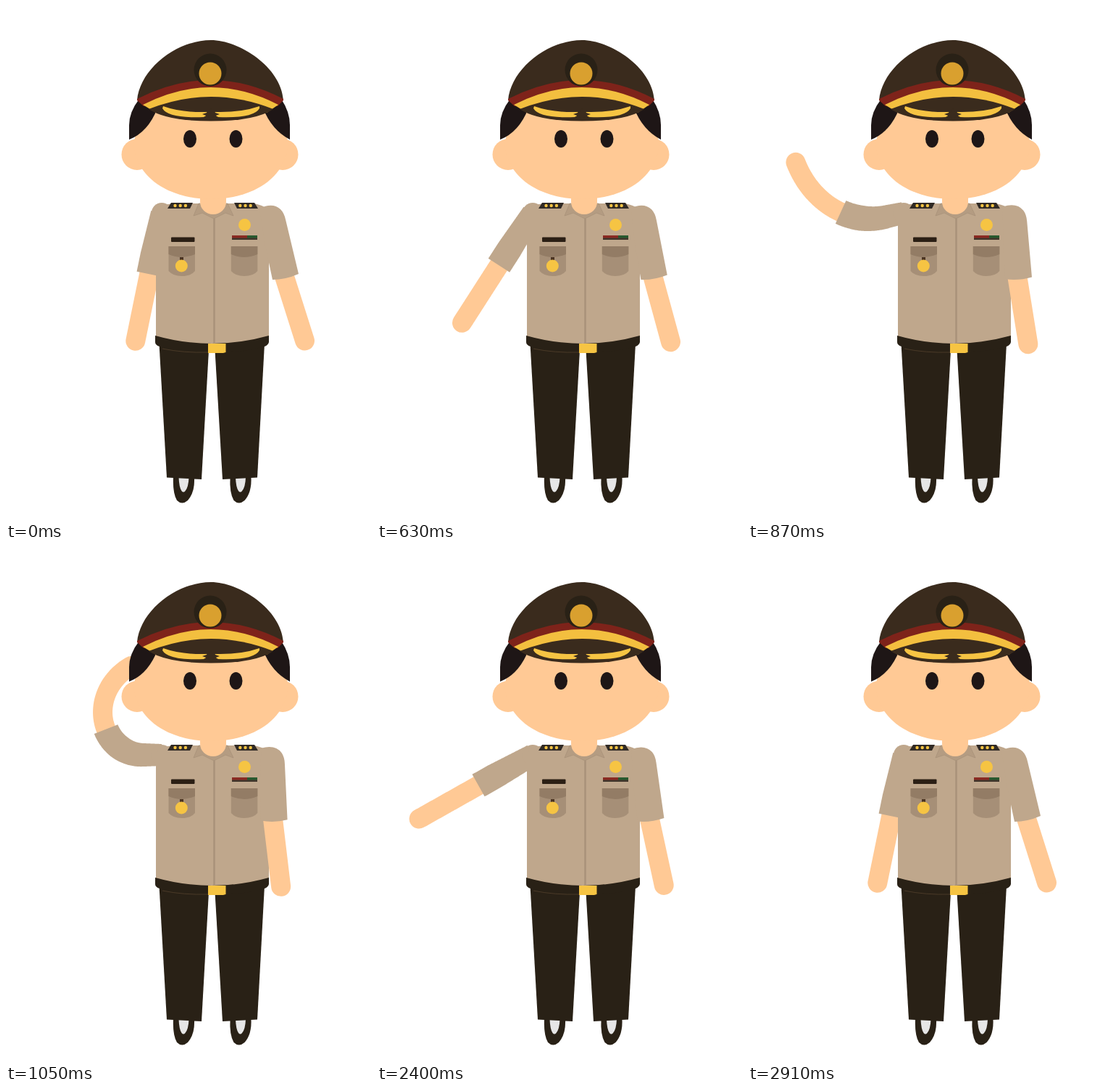
An HTML page for the animation above (3750 ms loop, 504 by 708 pixels).

```html
<!DOCTYPE html>
<html lang="en">
<head>
<meta charset="utf-8">
<title>Saluting officer</title>
<style>
  html, body { margin: 0; width: 100%; height: 100%; overflow: hidden; background: #fff; }
  svg { display: block; width: 504px; height: 708px; }
  .skin { fill: #ffc995; }
  .shirt { fill: #bfa78c; }
  .dark { fill: #292116; }
  .cap { fill: #3a2b1d; }
  .hair { fill: #1e1616; }
  .gold { fill: #f6c443; }
  .bone { fill: none; stroke: #ffc995; stroke-width: 27; stroke-linecap: round; stroke-linejoin: round; }
  .seam { fill: none; stroke: #a9927a; stroke-width: 2.5; }
</style>
</head>
<body>
<svg viewBox="0 0 504 708">
  <defs>
    <g id="pocket">
      <path fill="#a68f77" d="M0 0H36.5V34Q31 41 18 41Q6 41 0 34Z"/>
      <path fill="#937c65" d="M0 0H36.5V11Q18 19 0 11Z"/>
    </g>
    <g id="pips" class="gold">
      <circle r="2.2"/><circle cx="7.2" r="2.2"/><circle cx="14.4" r="2.2"/>
    </g>
    <g id="shoe">
      <path class="dark" d="M0 0H29Q30 21 20 32Q12 39 5 32Q-1 22 0 0Z"/>
      <path fill="#e6e6e6" d="M7.5 0H21.5Q21 14 16.500 19Q14 22 11.500 19Q8 14 7.500 0Z"/>
    </g>
  </defs>

  <g id="saluteArm">
    <path id="forearm" class="bone"/>
    <path id="sleeve" class="shirt"/>
    <circle class="shirt" cx="215" cy="285" r="14"/>
  </g>

  <g id="legs">
    <use href="#shoe" x="231" y="649"/>
    <use href="#shoe" x="309.500" y="649"/>
    <path class="dark" d="M211.500 465L280 474L270 652L222 649.500Z"/>
    <path class="dark" d="M288.500 474L357 465L347 649.500L299 652Z"/>
  </g>

  <g id="torso">
    <path class="shirt" d="M207 282Q212 275 224 273L230 272H343L350 274Q363 277 363 290V460Q284 482 207 460Z"/>
    <path class="dark" d="M206 454Q284 476 363 454V463Q362 467 357 469Q325 478 284 478Q240 478 212 469Q206 467 206 463Z"/>
    <path fill="none" stroke="#54412c" stroke-width=".8" d="M216 472Q245 478 279 477"/>
    <path class="gold" d="M279 465H303.500V477L300 478H279Z"/>
    <path class="seam" d="M287.500 292V465"/>
    <path d="M266 272L259 289L271 285L287 293L303 285L314 289L306 272Z" fill="#b49c82" stroke="#a9927a" stroke-width=".8"/>
    <path fill="#302a25" d="M228 271H258L254 279H223ZM315 271H343L348 279H319Z"/>
    <use href="#pips" x="233.500" y="275"/>
    <use href="#pips" x="323.300" y="275"/>
    <rect x="228" y="318.500" width="32.500" height="6.500" rx="1" fill="#2b1f14"/>
    <use href="#pocket" x="224.500" y="331"/>
    <use href="#pocket" x="310.800" y="331"/>
    <rect x="240" y="346" width="5" height="5" fill="#4b3423"/>
    <circle class="gold" cx="242.300" cy="358" r="8.500"/>
    <circle class="gold" cx="329.500" cy="301.500" r="8.500"/>
    <rect x="312" y="316" width="35" height="6" fill="#41362c"/>
    <rect x="312" y="316" width="21" height="3.500" fill="#8a2a22"/>
    <rect x="333" y="316" width="14" height="3.500" fill="#28592f"/>
  </g>

  <g id="restArm">
    <path class="bone" d="M382 365L412.500 461"/>
    <path class="shirt" d="M350 279Q368 270 379 280Q384 285 386 294L404 369Q386 377 368 377L358 330Z"/>
  </g>

  <g id="head">
    <path class="skin" d="M268 255H304V270A18 17 0 0 1 268 270Z"/>
    <circle class="skin" cx="181" cy="204.500" r="21.500"/>
    <circle class="skin" cx="382" cy="204.500" r="21.500"/>
    <path class="skin" d="M190 130H376L390 190C386 240 336 266 283 266C230 266 180 240 176 190Z"/>
    <path class="hair" d="M184 128Q170 146 170 164V184Q196 174 209 141Z"/>
    <path class="hair" d="M380 128Q392 146 392 164V184Q367 171 355 141Z"/>
    <ellipse class="hair eye" cx="254" cy="183" rx="9" ry="12"/>
    <ellipse class="hair eye" cx="317.500" cy="183" rx="9" ry="12"/>
  </g>

  <g id="hat">
    <path class="cap" d="M181 130C185 86 236 47 283 47C322 47 380 84 383 130Q283 95 181 130Z"/>
    <path fill="#7e231a" d="M181 128Q283 76 383 128V130L375 138H190L181 130Z"/>
    <path class="gold" style="fill:#f3bf3f" d="M189 136Q283 88 376 136L360 147H207Z"/>
    <path class="cap" d="M197 142Q283 108 369 142Q345 158.500 283 158.500Q222 158.500 197 142Z"/>
    <path class="gold" d="M217 138Q242 147 277 146Q280 150 273 153Q224 155 216 141ZM350 138Q324 147 289 146Q286 150 293 153Q342 155 350 141Z"/>
    <path class="cap" d="M283 141L286 146L295 149L287 152L283 158L279 152L271 149L280 146Z"/>
    <circle class="dark" cx="282" cy="88" r="22.500"/>
    <circle cx="282" cy="93" r="15.500" fill="#d9a02f"/>
  </g>
</svg>

<script>
const LOOP = 3750, STEP = 30;
const RAISE = 450, LOWER = 2100, MOVE = 600;
const BLINKS = [150, 2700], BLINK = 210;
const SHOULDER = { x: 215, y: 285 };
const CUFF = 86, ARM = 180, BEND_FROM = 26, BEND_SPAN = 160;

const $ = id => document.getElementById(id);
const eyes = document.querySelectorAll('.eye');
const clamp = v => Math.min(1, Math.max(0, v));
const smooth = v => { const u = clamp(v); return u * u * (3 - 2 * u); };
const toPath = points => 'M' + points.map(([x, y]) => x.toFixed(2) + ' ' + y.toFixed(2)).join('L');

const raised = t => t < LOWER
  ? smooth((t - RAISE) / MOVE)
  : 1 - smooth((t - LOWER) / MOVE);

function eyeOpen(t) {
  const closed = BLINKS.map(start => {
    const u = (t - start) / BLINK;
    return clamp(Math.min(u, 1 - u) * 7 / 3);
  });
  return 1 - 0.9 * Math.max(...closed);
}

// The arm swings straight up to half way, then curls towards the cap,
// bending most around the elbow.
function drawSaluteArm(p) {
  const curl = clamp(2 * p - 1);
  const base = p < 0.5 ? 11.6 + 98.2 * p : 60.7 + 29.3 * curl;
  const length = ARM + 14 * curl * curl;
  const cuff = CUFF + 6 * curl;
  const outer = [], inner = [], bone = [];
  let { x, y } = SHOULDER;
  for (let s = 0; s <= length; s++) {
    const u = Math.max(0, s - BEND_FROM) / BEND_SPAN;
    const angle = (base + 145 * curl * u * (1.25 - 0.25 * u)) * Math.PI / 180;
    const dx = -Math.sin(angle), dy = Math.cos(angle);
    if (s <= cuff) {
      const half = 15 + 2.5 * Math.min(1, s / 60);
      outer.push([x - dy * half, y + dx * half]);
      inner.unshift([x + dy * half, y - dx * half]);
    }
    if (s >= cuff - 12) bone.push([x, y]);
    x += dx;
    y += dy;
  }
  $('sleeve').setAttribute('d', toPath([...outer, ...inner]) + 'Z');
  $('forearm').setAttribute('d', toPath(bone));
}

function draw(t) {
  const p = raised(t), open = eyeOpen(t);
  drawSaluteArm(p);
  $('restArm').setAttribute('transform', `rotate(${10.8 * p} 368 290)`);
  eyes.forEach(eye => eye.setAttribute('ry', 12 * open));
}

const start = performance.now();
function tick() {
  const t = (performance.now() - start) % LOOP;
  draw(Math.floor(t / STEP) * STEP);
  requestAnimationFrame(tick);
}
tick();
</script>
</body>
</html>
```
